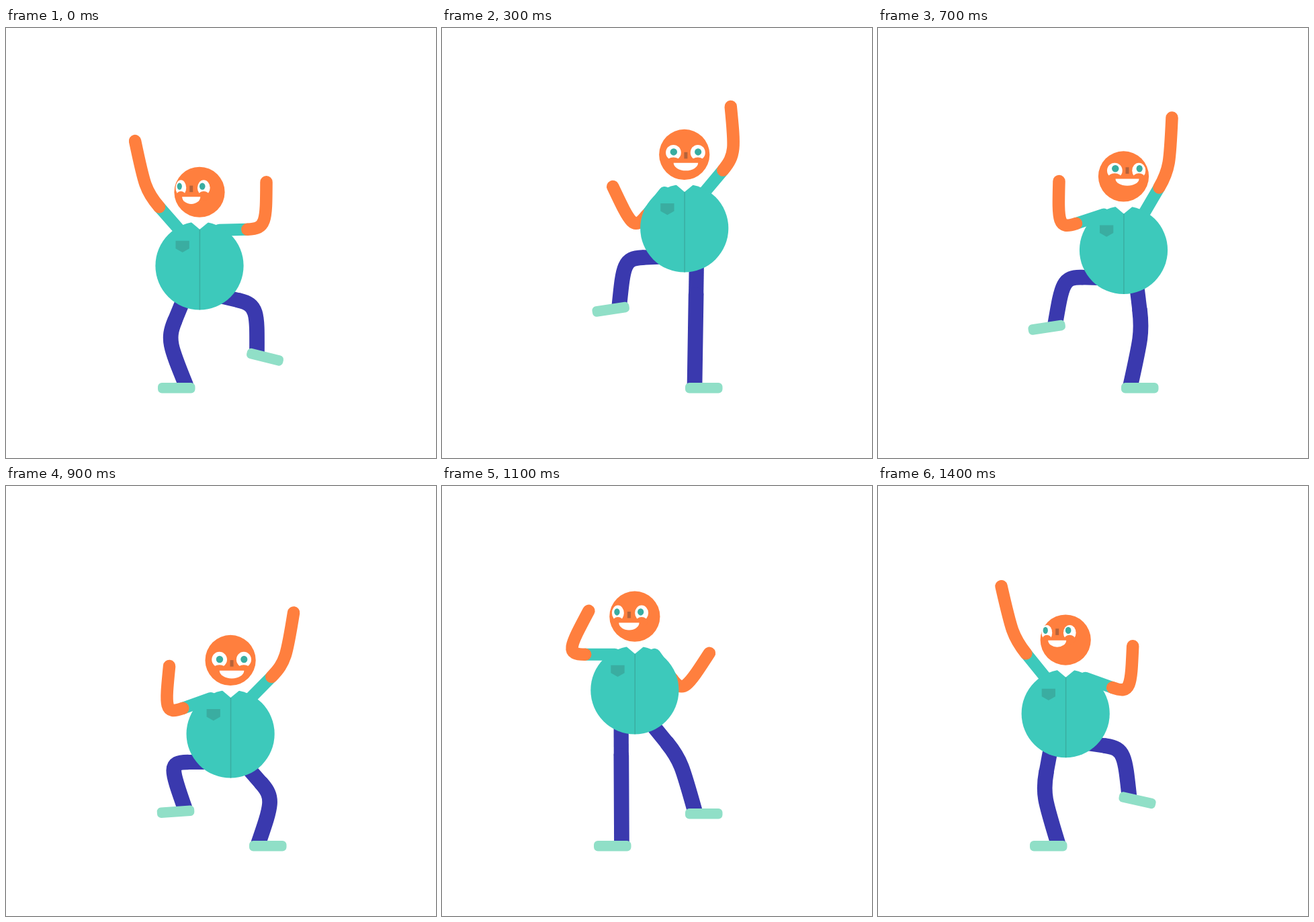
These frames come from a looping animation (640x640 px, 1500 ms). An HTML page with a canvas:

```html
<!DOCTYPE html>
<html lang="en">
<head>
<meta charset="utf-8">
<title>Dancer</title>
<style>
  html, body { margin: 0; width: 100%; height: 100%; overflow: hidden; background: #fff; }
  canvas { display: block; width: 640px; height: 640px; }
</style>
</head>
<body>
<canvas id="stage" width="640" height="640"></canvas>
<script>
const ctx = document.getElementById('stage').getContext('2d');
const STEP = 100, STEPS = 15;
const SKIN = '#ff7f3e', SHIRT = '#3dc9bb', SHADE = '#3aada1',
      TROUSERS = '#3a39ae', SHOE = '#90dfc7', NOSE = '#b5633a', WHITE = '#fff';

// Turning points of the dance: [step, ...values], eased in between.
const height = [[1, 369], [3, 298], [5, 322.5], [7, 330.5], [9, 369], [12, 281], [14, 338.7]];
const leftHand = [
  [0.5, -96, -185], [3, -106.5, -62], [5, -101, -104], [9, -91, -101],
  [11, -68.5, -118], [13, -95.5, -192]
];
const rightHand = [
  [0, 99.5, -124.5], [3, 69, -181], [4, 70.5, -198], [7, 72, -197],
  [9, 94, -180.5], [11, 111, -55], [14, 100, -100.5]
];
// Foot lift and tilt in degrees.
const leftFoot = [[1, 0, 0], [3, 117, -8.5], [5, 90, -8.5], [7, 90, -8.5], [9, 51, -4], [10, 0, 0]];
const rightFoot = [[0, 46, 14], [1, 0, 0], [10, 0, 0], [11, 48, 0], [12.5, 105, 10], [14, 68, 12.5]];

const wrap = t => (t + STEPS) % STEPS;
const mix = (a, b, k) => a.map((v, i) => v + (b[i] - v) * k);

function ease(t, from, to) {
  const k = Math.min(1, Math.max(0, (t - from) / (to - from)));
  return k * k * (3 - 2 * k);
}

function sample(keys, t) {
  const next = Math.max(0, keys.findIndex(key => key[0] > t));
  const a = keys.at(next - 1), b = keys[next];
  return mix(a, b, ease(wrap(t - a[0]), 0, wrap(b[0] - a[0]))).slice(1);
}

// Weight on the left foot is 0, on the right foot 1.
function lean(t) {
  const s = t > 13 ? t - STEPS : t;
  return ease(s, -0.9, 3.65) - ease(s, 7, 11.9);
}

function ellipse(x, y, rx, ry, color, end = Math.PI * 2) {
  ctx.fillStyle = color;
  ctx.beginPath();
  ctx.ellipse(x, y, rx, ry, 0, 0, end);
  ctx.fill();
}

function polygon(points, color) {
  ctx.fillStyle = color;
  ctx.beginPath();
  points.forEach(p => ctx.lineTo(...p));
  ctx.fill();
}

function stroke(color, width, cap) {
  ctx.strokeStyle = color;
  ctx.lineWidth = width;
  ctx.lineCap = cap;
  ctx.stroke();
}

// The joint bends out sideways as the two ends come closer.
function joint(a, b, side) {
  const dx = b[0] - a[0], dy = b[1] - a[1], d = Math.hypot(dx, dy);
  const bend = side * Math.max(0, 0.6 * (181 - d)) / d;
  return [(a[0] + b[0]) / 2 + dy * bend, (a[1] + b[1]) / 2 - dx * bend];
}

// Straight upper part, then a tight corner running out into a soft bow.
function limb(a, b, side, upper, lower, width, cap) {
  const corner = joint(a, b, side), cuff = mix(a, corner, 0.6);
  ctx.beginPath();
  ctx.moveTo(...a);
  ctx.lineTo(...cuff);
  stroke(upper, width - 0.5, cap);
  ctx.beginPath();
  ctx.moveTo(...cuff);
  ctx.bezierCurveTo(...corner, ...mix(corner, b, 0.15), ...b);
  stroke(lower, width, 'round');
}

function drawArm([x, y], hand, side) {
  const shoulder = [x + side * 29.5, y - 53];
  limb(shoulder, [x + hand[0], y + hand[1]], -side, SHIRT, SKIN, 18.5, 'round');
}

function drawLeg([x, y], [lift, tilt], side) {
  const angle = tilt * Math.PI / 180, c = Math.cos(angle), s = Math.sin(angle);
  const footX = 321.75 + side * 68 - 0.3 * Math.abs(tilt), footY = 535.75 - lift;
  const hip = [x + side * 19.3 - 1, y + 42];
  const ankle = [footX - side * 13.7 * c, footY - side * 13.7 * s];

  // Trousers end at the top of the shoe.
  ctx.save();
  ctx.beginPath();
  ctx.rect(0, 0, 640, ankle[1]);
  ctx.clip();
  limb(hip, [ankle[0] + 5 * s, ankle[1] - 5 * c], side, TROUSERS, TROUSERS, 22.7, 'butt');
  ctx.restore();

  ctx.save();
  ctx.translate(footX, footY);
  ctx.rotate(angle);
  ctx.fillStyle = SHOE;
  ctx.beginPath();
  ctx.roundRect(-27.75, -7.75, 55.5, 15.5, 6);
  ctx.fill();
  ctx.restore();
}

function drawTorso([x, y]) {
  ctx.save();
  ctx.translate(x, y);
  ellipse(0, 0, 65.6, 65.6, SHIRT);
  polygon([[-14.5, -66.5], [0.3, -54], [15.5, -66.5]], WHITE);
  ctx.beginPath();
  ctx.moveTo(0.4, -54);
  ctx.lineTo(0.4, 65.5);
  stroke(SHADE, 1.5, 'butt');
  polygon([[-35.5, -37], [-15.2, -37], [-15.2, -25.5], [-25.3, -19.8], [-35.5, -25.5]], SHADE);
  ctx.restore();
}

function drawEye(x, turn, nod, width) {
  ellipse(x, 0.75 * nod, width / 2, 11.5, WHITE);
  ellipse(x + 0.17 * turn, nod, width * 0.23, 5.2, SHADE);
  ellipse(x, 15.5 + 1.12 * nod, width * 0.45, 7, SKIN);
}

// Features slide over the round head as it turns and nods.
function drawHead([x, y], turn, nod) {
  const left = Math.min(turn, 0), right = Math.max(turn - 1, 0);
  const middle = turn * 0.87, gap = 18.2 - 0.008 * turn * turn;
  ctx.save();
  ctx.translate(x, y - 109.6);
  ellipse(0, 0, 37.6, 37.6, SKIN);
  drawEye(middle - gap, turn, nod, 22.7 + 0.56 * left);
  drawEye(middle + gap, turn, nod, 22.7 + 0.32 * left - 0.6 * right);
  ctx.fillStyle = NOSE;
  ctx.fillRect(turn - 2.5, 1.6 + 1.3 * nod, 5, 9.6);
  ellipse(turn, 17 + 1.15 * nod, 18.5 + 0.4 * left - 0.22 * right, 12 + 0.15 * nod, WHITE, Math.PI);
  ctx.restore();
}

function draw(t) {
  const body = [279.2 + 86.3 * lean(t), ...sample(height, t)];
  const turn = -12.5 + 18 * lean(wrap(t - 0.6));
  const nod = -8.5 + 7.5 * Math.cos((t - 1.9) / 7.5 * Math.PI * 2);
  ctx.fillStyle = WHITE;
  ctx.fillRect(0, 0, 640, 640);
  drawLeg(body, sample(leftFoot, t), -1);
  drawLeg(body, sample(rightFoot, t), 1);
  drawArm(body, sample(leftHand, t), -1);
  drawArm(body, sample(rightHand, t), 1);
  drawTorso(body);
  drawHead(body, turn, nod);
}

// The dance is held on steps of a tenth of a second.
const start = performance.now();
function tick() {
  draw(Math.floor((performance.now() - start) / STEP) % STEPS);
  requestAnimationFrame(tick);
}
tick();
</script>
</body>
</html>
```
